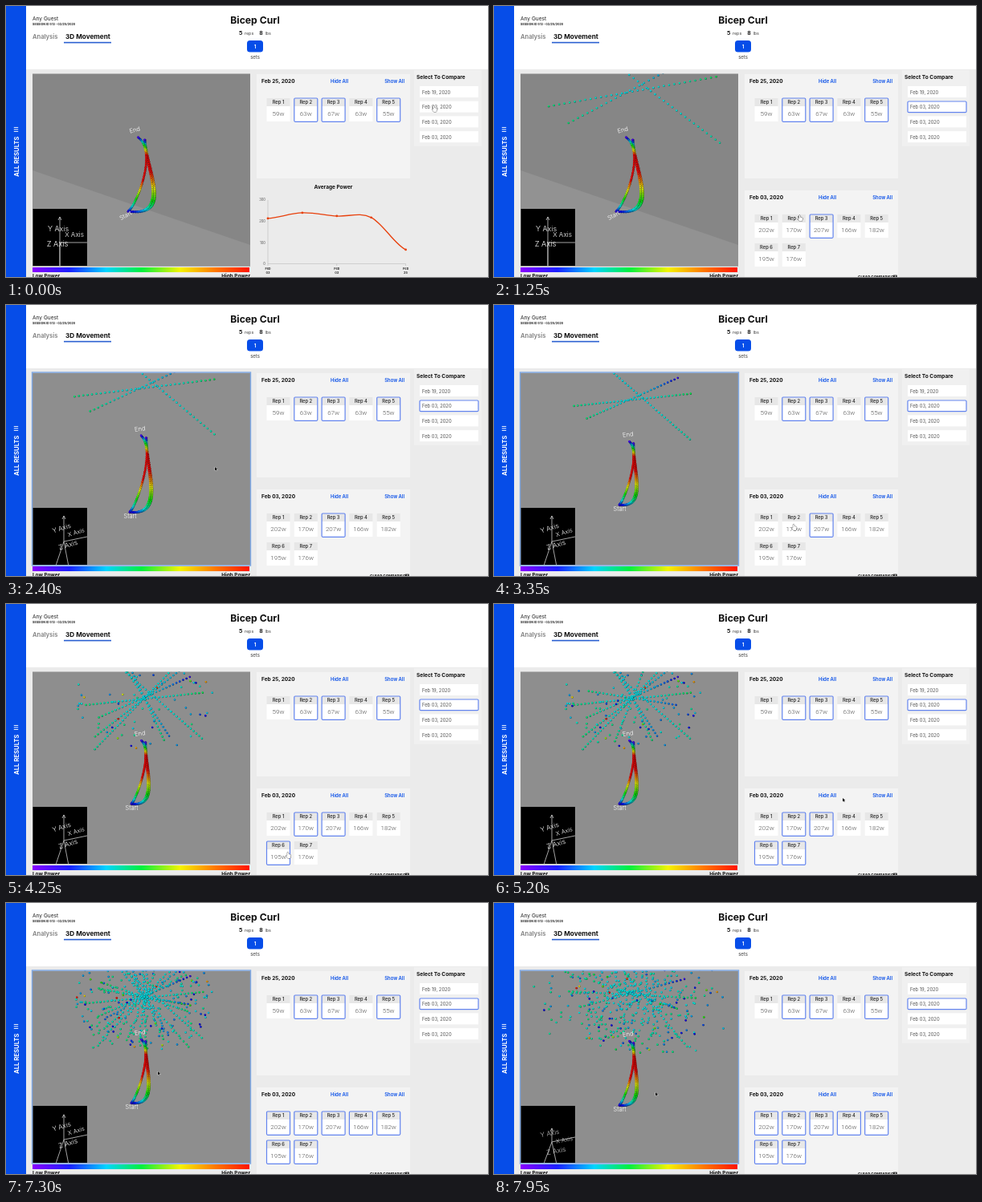
Animation, 600 px wide and 338 px high, one loop 8000 ms. Source, as an HTML page with a canvas:

```html
<!DOCTYPE html>
<html lang="en">
<head>
<meta charset="utf-8">
<title>3D Movement</title>
<style>
  html, body { margin: 0; width: 100%; height: 100%; overflow: hidden; background: #fff; }
  svg, canvas { position: absolute; left: 0; top: 0; width: 100%; height: 100%; display: block; }
  text { font-family: Inter, "Open Sans", sans-serif; }
  .value { font-family: Roboto, sans-serif; }
</style>
</head>
<body>
<svg id="page" viewBox="0 0 600 338" preserveAspectRatio="none">
  <defs>
    <linearGradient id="power">
      <stop offset="0" stop-color="#8a00ff"/><stop offset=".17" stop-color="#1a20ff"/>
      <stop offset=".34" stop-color="#00d5ff"/><stop offset=".5" stop-color="#00f040"/>
      <stop offset=".68" stop-color="#f4f400"/><stop offset=".84" stop-color="#ff7a00"/>
      <stop offset="1" stop-color="#ff1200"/>
    </linearGradient>
  </defs>
</svg>
<canvas id="scene"></canvas>
<script>
const LOOP = 8000, BLUE = '#064de8', INK = '#111';
const page = document.getElementById('page');
const canvas = document.getElementById('scene');
const ctx = canvas.getContext('2d');

// ---------- page ----------
function add(parent, tag, attrs, content) {
  const node = document.createElementNS('http://www.w3.org/2000/svg', tag);
  for (const key in attrs) node.setAttribute(key, attrs[key]);
  if (content !== undefined) node.textContent = content;
  return parent.appendChild(node);
}
const box = (p, x, y, width, height, fill, more) => add(p, 'rect', { x, y, width, height, fill, ...more });
const label = (p, x, y, size, weight, fill, content, more) =>
  add(p, 'text', { x, y, 'font-size': size, 'font-weight': weight, fill, ...more }, content);
const MID = { 'text-anchor': 'middle' };
const END = { 'text-anchor': 'end' };
const outline = (p, x, y, w, h) =>
  box(p, x, y, w, h, 'none', { stroke: '#6384ee', 'stroke-width': 1.2, rx: 1.2 });

function header() {
  box(page, 0, 0, 600, 338, '#ebebeb');
  box(page, 25, 0, 575, 79, '#fff');
  box(page, 0, 0, 25, 338, BLUE);
  for (let y = 151; y < 158; y += 2.5) box(page, 9.8, y, 5.4, 0.9, '#fff');
  label(page, 0, 0, 7.7, 700, '#fff', 'ALL RESULTS', { transform: 'translate(15.6 213) rotate(-90)' });
  label(page, 33, 17.6, 6.6, 400, '#222', 'Any Guest');
  label(page, 33, 24, 3.7, 700, '#222', 'SESSION ID 513 - 02/25/2020');
  label(page, 33, 41.4, 7.6, 600, '#808080', 'Analysis');
  label(page, 74, 41.4, 8.2, 700, INK, '3D Movement');
  box(page, 72, 44.8, 59, 1.6, '#2a5fd0');
  label(page, 310, 21.5, 12.2, 700, INK, 'Bicep Curl', MID);
  label(page, 292, 36, 8, 500, INK, '5', { ...MID, class: 'value' });
  label(page, 297, 36, 5.4, 400, '#444', 'reps');
  label(page, 317.6, 36, 8, 500, INK, '8', { ...MID, class: 'value' });
  label(page, 322.5, 36, 5.4, 400, '#444', 'lbs');
  box(page, 300, 43, 20, 14.5, BLUE, { rx: 3.5 });
  label(page, 310, 52.6, 6.5, 600, '#fff', '1', MID);
  label(page, 310, 66, 6, 400, '#444', 'sets', MID);
  box(page, 33, 326, 270, 6, 'url(#power)');
  label(page, 33, 339, 6.4, 700, INK, 'Low Power');
  label(page, 304, 339, 6.4, 700, INK, 'High Power', END);
}

const cardAt = (top, rep) => [339 + 34.3 * (rep % 5), top + 30 + 36 * Math.floor(rep / 5)];

// Returns one selection outline per repetition.
function repPanel(parent, top, height, date, watts) {
  box(parent, 312, top, 191, height, '#f3f3f3');
  label(parent, 318, top + 11.4, 6.5, 700, INK, date);
  label(parent, 415, top + 11, 5.9, 600, BLUE, 'Hide All', MID);
  label(parent, 483.6, top + 11, 5.9, 600, BLUE, 'Show All', MID);
  return watts.map((w, rep) => {
    const [x, y] = cardAt(top, rep);
    box(parent, x - 14.5, y, 29, 10, '#e7e7e7');
    box(parent, x - 14.5, y + 10, 29, 19, '#fff');
    label(parent, x, y + 7.4, 5.8, 500, '#222', 'Rep ' + (rep + 1), MID);
    label(parent, x, y + 22, 8, 300, '#555', w + 'w', { ...MID, class: 'value' });
    return outline(parent, x - 14.5, y, 29, 29.3);
  });
}

function comparePanel() {
  box(page, 508, 80, 84, 95, '#f0f0f0');
  label(page, 511, 91, 6.6, 700, INK, 'Select To Compare');
  ['Feb 19, 2020', 'Feb 03, 2020', 'Feb 03, 2020', 'Feb 03, 2020'].forEach((date, i) => {
    box(page, 515, 100 + 18.7 * i, 73, 14, '#fff');
    label(page, 518, 109.6 + 18.7 * i, 5.8, 400, '#555', date);
  });
  return outline(page, 515, 119, 73, 13.6);
}

function powerChart() {
  const g = add(page, 'g');
  const px = i => 326 + 42.9 * i, py = watts => 321.5 - watts * .267;
  label(g, 407.5, 227.6, 6.5, 700, INK, 'Average Power', MID);
  for (let w = 0; w <= 300; w += 100) label(g, 323, py(w) + 1.8, 4.2, 400, '#555', w, END);
  add(g, 'path', { d: `M326 242V321.5H${px(4)}`, fill: 'none', stroke: '#bbb', 'stroke-width': 0.6 });
  ['03', '03', '25'].forEach((day, i) => {
    box(g, px(2 * i) - .3, 321.5, .6, 2.5, '#bbb');
    label(g, px(2 * i), 329, 4, 600, '#222', 'Feb', MID);
    label(g, px(2 * i), 334.4, 4, 600, '#222', day, MID);
  });
  const watts = [212, 238, 223, 216, 66];
  const slope = i => ((watts[i + 1] ?? watts[i]) - (watts[i - 1] ?? watts[i])) / 6;
  let d = `M${px(0)} ${py(watts[0])}`;
  watts.forEach((w, i) => {
    if (i) d += `C${px(i - .67)} ${py(watts[i - 1] + slope(i - 1))} ${px(i - .33)} ${py(w - slope(i))} ${px(i)} ${py(w)}`;
    add(g, 'circle', { cx: px(i), cy: py(w), r: 1.4, fill: '#e8400c' });
  });
  add(g, 'path', { d, fill: 'none', stroke: '#e8400c', 'stroke-width': 1.3 });
  return g;
}

header();
repPanel(page, 85, 130, 'Feb 25, 2020', [59, 63, 67, 63, 55])
  .forEach((mark, rep) => { if (rep % 3 === 0) mark.remove(); });
const picked = comparePanel();
const chart = powerChart();
const compared = add(page, 'g');
const marks = repPanel(compared, 230, 108, 'Feb 03, 2020', [202, 170, 207, 166, 182, 195, 176]);
label(compared, 453, 339.8, 4.6, 700, INK, 'CLEAR COMPARISON');
box(compared, 497.5, 336, 4, 4, 'none', { stroke: INK, 'stroke-width': 0.7 });

// ---------- timing ----------
const COMPARE = 250, HIDE = 5650, SHOW = 6600;
const CLICKS = { 2: 1150, 1: 3500, 5: 4150, 6: 4650 };
const isOn = (rep, t) => t >= SHOW || (t >= CLICKS[rep] && t < HIDE);
const hasFocus = t => (t >= 1600 && t < CLICKS[1]) || t >= 7150;

const clamp = u => Math.max(0, Math.min(1, u));
const mix = (a, b, u) => a + (b - a) * u;
const smooth = u => u * u * (3 - 2 * u);
const ramp = (t, from, to) => smooth(clamp((t - from) / (to - from)));

// Orbit, zoom out, then a second small orbit: 0 to 3.
const cameraAt = t => ramp(t, 1550, 2350) + ramp(t, 2550, 3050) + ramp(t, 7200, 7950);

const overCard = rep => { const [x, y] = cardAt(230, rep); return [x, y + 17]; };
// arrival time, place; the last 500 ms before arrival are spent moving
const STOPS = [
  [0, 533, 128], [1050, 398, 275], [1650, 235, 175], [2350, 261, 204],
  [3250, ...overCard(1)], [4000, ...overCard(5)], [4550, ...overCard(6)],
  [5200, 435, 244], [5450, 415, 240], [6300, 477, 240], [7150, 190, 212], [7950, 202, 238]
];
function pointerAt(t) {
  const next = STOPS.findIndex(stop => stop[0] > t);
  if (next < 0) return STOPS[STOPS.length - 1].slice(1);
  const [t0, x0, y0] = STOPS[next - 1], [t1, x1, y1] = STOPS[next];
  const u = ramp(t, Math.max(t0, t1 - 500), t1);
  return [mix(x0, x1, u), mix(y0, y1, u)];
}

// ---------- scene ----------
// start, end and bow of the curl; height, zoom and roll of the compared reps
const VIEWS = [
  [152, 256, 167, 166, 1.3, 105, 1.45, -4],
  [154, 258, 170, 165, 1, 102, 1.2, -1],
  [156, 249, 170, 172, .95, 117, 1, 0],
  [156, 252, 170, 174, .95, 113, 1.08, 9]
];
function viewAt(p) {
  const i = Math.min(2, Math.floor(p));
  return VIEWS[i].map((v, k) => mix(v, VIEWS[i + 1][k], p - i));
}

function random(seed) {
  return () => (seed = (seed * 16807) % 2147483647) / 2147483647;
}
// A straight row of dots through the hub, aqua in the middle.
function row(angle, half, shift, tip, depth) {
  const a = angle * Math.PI / 180, n = Math.round(half / 2.3);
  return Array.from({ length: n + 1 }, (_, i) => {
    const s = 2 * i / n - 1;
    return {
      x: Math.cos(a) * half * s, y: Math.sin(a) * half * s + shift,
      hue: mix(182, s > 0 ? tip : 150, s * s), depth: depth()
    };
  });
}
function looseRep(rep) {
  const rnd = random(4001 + rep * 977);
  const depth = () => (rnd() - .5) * 70;
  const rows = [0, 1].flatMap(k =>
    row(rep * 47 + k * 77 + 10, 55 + rnd() * 40, 0, 60 + rnd() * 190, depth));
  const strays = Array.from({ length: 36 }, () => {
    const a = rnd() * Math.PI * 2, r = 85 * Math.sqrt(rnd()), tone = rnd();
    const hue = tone < .7 ? 150 + rnd() * 55 : tone < .9 ? 205 + rnd() * 40 : rnd() * 110;
    return { x: Math.cos(a) * r, y: Math.sin(a) * r * .8, hue, depth: depth() };
  });
  return [...rows, ...strays];
}
const flat = () => 0;
const steadyRep = [...row(-6, 73, 1, 140, flat), ...row(-24, 62, -1, 252, flat), ...row(41, 95, -12, 165, flat)];
const REPS = marks.map((_, rep) => rep === 2 ? steadyRep : looseRep(rep));

function dot(x, y, hue, r) {
  ctx.fillStyle = `hsl(${hue} 90% 24%)`;
  ctx.beginPath(); ctx.arc(x + .3, y + .3, r, 0, 7); ctx.fill();
  ctx.fillStyle = `hsl(${hue} 92% 46%)`;
  ctx.beginPath(); ctx.arc(x, y, r * .82, 0, 7); ctx.fill();
}

// Violet at both ends, red within a band around the peak.
function powerHue(u, peak, band) {
  const far = Math.abs(u - peak), edge = u < peak ? peak : 1 - peak;
  return 255 * clamp((far - band) / (edge - band));
}

// Cubic stroke in a frame that runs along the curl; each point is [along, across].
function stroke(view, c1, c2, c3, bow, hueAt) {
  const [sx, sy, ex, ey] = view, dx = ex - sx, dy = ey - sy, count = 50;
  for (let i = 0; i <= count; i++) {
    const u = i / count, v = 1 - u;
    const [along, across] = [0, 1].map(k =>
      3 * v * v * u * c1[k] + 3 * v * u * u * c2[k] + u * u * u * c3[k]);
    dot(sx + dx * along - dy * across * bow, sy + dy * along + dx * across * bow, hueAt(u), 1.45);
  }
}
function drawCurl(view) {
  const bow = view[4];
  const back = u => powerHue(u, .76, .08), rise = u => powerHue(u, .6, .14);
  for (const k of [1, .9]) stroke(view, [.02, .49], [.59, .125], [1, .05], bow * k, back);
  stroke(view, [.13, .08], [.87, .2], [1.02, -.025], bow, rise);
}

function tilted(content, x, y, degrees, size) {
  ctx.save();
  ctx.translate(x, y);
  ctx.rotate(degrees * Math.PI / 180);
  ctx.font = `300 ${size}px Inter, sans-serif`;
  ctx.textAlign = 'center';
  ctx.fillStyle = '#fff';
  ctx.fillText(content, 0, 0);
  ctx.restore();
}

function drawBackdrop(p) {
  const away = clamp(p);
  ctx.fillStyle = `rgb(${Array(3).fill(mix(134, 142, away))})`;
  ctx.fillRect(33, 84, 271, 241);
  ctx.fillStyle = '#929292';
  ctx.beginPath();
  ctx.moveTo(33, 205 + 180 * away);
  ctx.lineTo(304, 298 + 180 * away);
  ctx.lineTo(304, 500);
  ctx.lineTo(33, 500);
  ctx.fill();
}

function drawReps(t, p, view) {
  const [hubY, zoom, roll] = view.slice(5), turn = clamp(p - 2);
  const a = roll * Math.PI / 180, c = Math.cos(a) * zoom, s = Math.sin(a) * zoom;
  REPS.forEach((dots, rep) => {
    if (!isOn(rep, t)) return;
    for (const { x, y, hue, depth } of dots)
      dot(172 + x * c - y * s + depth * turn, hubY + x * s + y * c + depth * turn * .3, hue, 1.25);
  });
}

function drawAxes(p) {
  const tilt = clamp(p), dip = clamp(p - 2);
  const ox = 67 + 5 * tilt, oy = 295 + 3 * dip, top = oy - 32 + 15 * dip;
  ctx.save();
  ctx.beginPath(); ctx.rect(33.5, 253, 67.5, 71); ctx.clip();
  ctx.fillStyle = '#000';
  ctx.fillRect(33, 253, 68, 71);
  ctx.strokeStyle = '#ccc';
  ctx.lineWidth = .8;
  ctx.beginPath();
  ctx.moveTo(ox, top); ctx.lineTo(ox, oy); ctx.lineTo(ox + 6 * tilt, 326);
  ctx.moveTo(101, oy - 6 * tilt); ctx.lineTo(ox, oy); ctx.lineTo(ox - 10 * tilt, 325);
  ctx.moveTo(ox - 2, top + 4); ctx.lineTo(ox, top); ctx.lineTo(ox + 2, top + 4);
  ctx.stroke();
  ctx.globalAlpha = 1 - .25 * dip;
  const angle = -17 * tilt + 6 * dip, size = 9 - .8 * tilt;
  tilted('Y Axis', ox - 2, oy - 14 + 6 * dip, angle, size);
  tilted('X Axis', ox + 18 - 2 * tilt, oy - 7 - 2 * tilt + 9 * dip, angle, size - .8);
  tilted('Z Axis', ox - 3 + 9 * tilt, oy + 5 + 2 * tilt + 7 * dip, angle, size + .3);
  ctx.restore();
}

const HAND = new Path2D('M-1-3.2Q0-4 .5-3V-1L3-.4Q3.6 0 3.3 1.6L2.6 4H-.6L-2.8.8Q-2.6-.2-1 .8Z');
const ARROW = new Path2D('M-1-2V2.4L.1 1.4L.9 3L1.7 2.6L1 1.1H2.3Z');
function drawPointer(t) {
  const [x, y] = pointerAt(t);
  const hand = x > 312 && Math.abs(x - 435) > 12;
  const shape = hand ? HAND : ARROW;
  ctx.save();
  ctx.translate(x, y);
  ctx.lineWidth = .7;
  ctx.lineJoin = 'round';
  ctx.strokeStyle = hand ? '#222' : '#fff';
  ctx.fillStyle = hand ? '#fff' : INK;
  ctx.stroke(shape);
  ctx.fill(shape);
  ctx.restore();
}

function drawScene(t) {
  const p = cameraAt(t), view = viewAt(p), skew = 1 - clamp(p);
  const [sx, sy, ex, ey] = view;
  ctx.clearRect(0, 0, 600, 338);
  ctx.save();
  ctx.beginPath(); ctx.rect(33, 84.4, 271, 240); ctx.clip();
  drawBackdrop(p);
  drawReps(t, p, view);
  drawCurl(view);
  tilted('End', ex - 3 - 3 * skew, ey - 8 - skew, -6 - 10 * skew, 7.6);
  tilted('Start', sx + .5 - 2.5 * skew, sy + 7.5, -28 * skew, 7.4);
  drawAxes(p);
  ctx.restore();
  if (hasFocus(t)) {
    ctx.strokeStyle = '#7fa9e6';
    ctx.lineWidth = 1.4;
    ctx.strokeRect(32.5, 84, 272, 241);
  }
  drawPointer(t);
}

function updatePage(t) {
  const show = (node, on) => { node.style.display = on ? '' : 'none'; };
  const comparing = t >= COMPARE;
  show(chart, !comparing);
  show(compared, comparing);
  show(picked, comparing);
  marks.forEach((mark, rep) => show(mark, isOn(rep, t)));
}

function fit() {
  const ratio = window.devicePixelRatio || 1;
  canvas.width = innerWidth * ratio;
  canvas.height = innerHeight * ratio;
  ctx.setTransform(canvas.width / 600, 0, 0, canvas.height / 338, 0, 0);
}
addEventListener('resize', fit);
fit();

const begin = performance.now();
function frame() {
  const t = Math.max(0, performance.now() - begin) % LOOP;
  updatePage(t);
  drawScene(t);
  requestAnimationFrame(frame);
}
frame();
</script>
</body>
</html>
```
